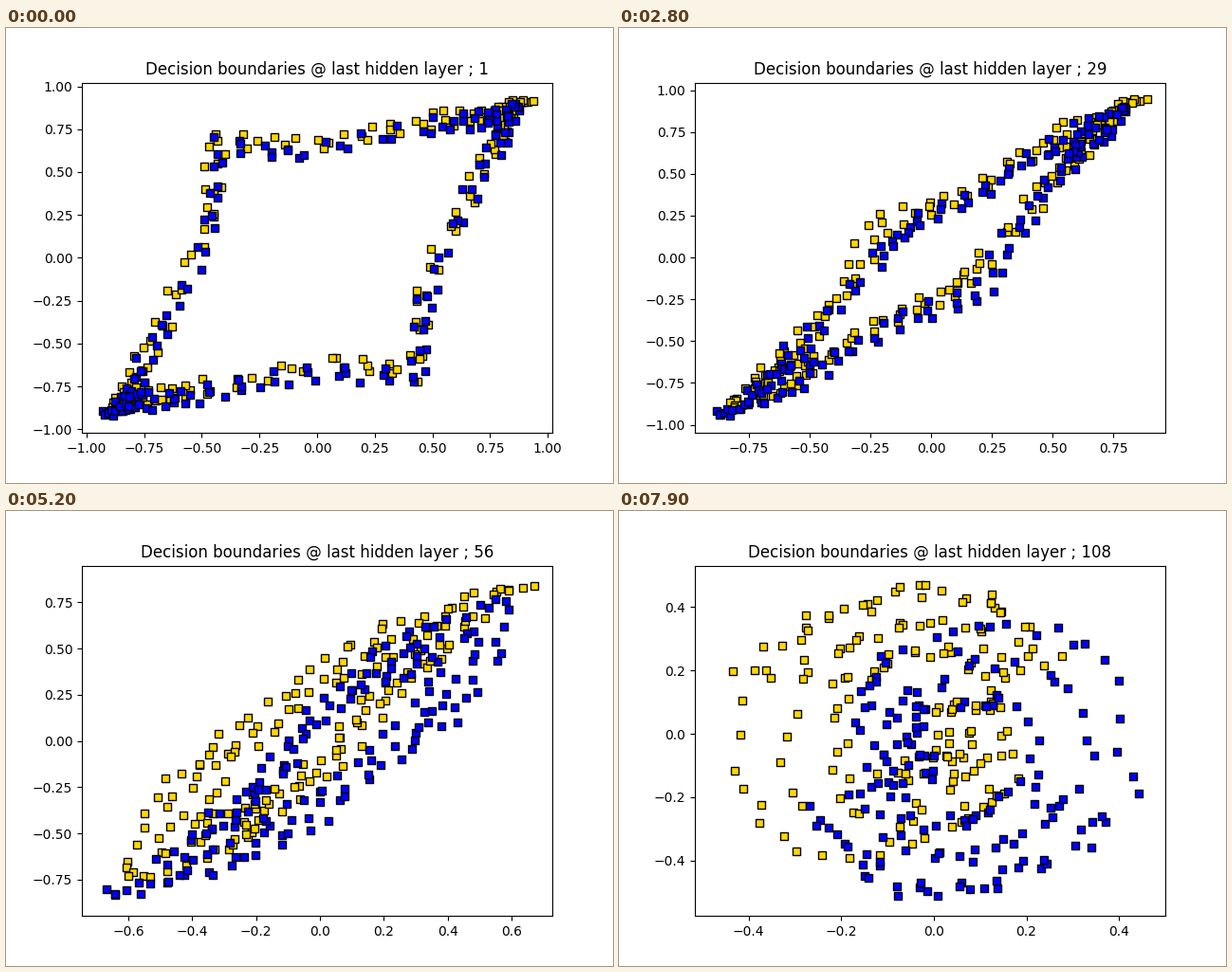
Write a matplotlib script that moves like this. It is 640 by 480 pixels and loops after 8000 ms.

```python
import numpy as np
import matplotlib.pyplot as plt
from matplotlib.animation import FuncAnimation

FRAMES, STEP = 80, 100
POINTS, TURNS = 165, 3
TIMES = [0, 9, 28, 43, 52, 68, 79]

# Outer turn of the gold spiral in hundredths, counterclockwise from the top right.
OUTLINES = np.array([
    [92, 91, 50, 84, 0, 70, -47, 74, -50, 20, -91, -91, -50, -83, 10, -66, 46, -74, 50, -15],
    [92, 92, 58, 72, 26, 76, 6, 70, -1, 25, -92, -92, -55, -72, -25, -79, -2, -35, 12, 40],
    [87, 94, 55, 80, 14, 42, -24, 26, -43, -28, -87, -94, -63, -86, -28, -50, 6, -28, 26, -4],
    [66, 82, 45, 78, 14, 50, -14, 24, -44, -20, -65, -88, -57, -75, -22, -45, 6, -2, 32, 28],
    [65, 83, 32, 70, 3, 48, -28, 5, -52, -28, -66, -84, -34, -67, -18, -52, 8, -13, 28, 32],
    [41, 53, 14, 36, -10, 39, -33, 25, -40, 2, -50, -60, -20, -37, 10, -36, 20, -10, 17, 12],
    [25, 22, 13, 45, -8, 47, -28, 36, -45, 20, -43, -33, -17, -46, 11, -34, 20, -18, 16, 9],
]).reshape(7, 10, 2) / 100

# Per stage: size of the inner turn, gathering at the two tips, scatter, blue offset.
INNER = [.85, .75, .65, .6, .45, .3, .3]
GATHER = [.8, .8, .7, .5, .2, -.4, -.2]
SPREAD = [.012, .014, .015, .018, .02, .018, .02]
OFFSET = [0, 0, 0, 0, 0, -.045, -.035]

# Per stage: left, right, bottom, top of the axes.
LIMITS = np.array([
    [-1.020, 1.020, -1.022, 1.022],
    [-1.029, 1.021, -1.034, 1.030],
    [-0.973, 0.965, -1.049, 1.045],
    [-0.739, 0.730, -1.001, 0.992],
    [-0.7455, 0.7277, -0.946, 0.949],
    [-0.583, 0.525, -0.698, 0.644],
    [-0.516, 0.500, -0.574, 0.530],
])

rng = np.random.default_rng(4)
noise = rng.normal(size=(2, POINTS, 2)).clip(-1.6, 1.6)
walk = np.linspace(0, 1, POINTS) ** 1.3


def spiral(outline, inner, gather):
    """Wind inwards along the outline, slowing down at its two tips."""
    turn = TURNS * walk
    turn = turn - gather * np.sin(4 * np.pi * turn) / (4 * np.pi)
    count = len(outline)
    ring = np.column_stack([np.interp(turn * count, np.arange(count), axis, period=count)
                            for axis in outline.T])
    center = outline.mean(axis=0)
    size = 1 - (1 - inner) * walk
    return center + (ring - center) * size[:, None]


paths = [spiral(*stage) for stage in zip(OUTLINES, INNER, GATHER)]
gold = np.array([p + s * noise[0] for p, s in zip(paths, SPREAD)])
blue = np.array([[0, o] - p + s * noise[1] for p, s, o in zip(paths, SPREAD, OFFSET)])


def blend(keys, t):
    i = min(np.searchsorted(TIMES, t, side="right") - 1, len(TIMES) - 2)
    f = (t - TIMES[i]) / (TIMES[i + 1] - TIMES[i])
    return keys[i] * (1 - f) + keys[i + 1] * f


def epoch(t):
    return t + 1 + round(27.9 * (max(t - 28, 0) / 51) ** 3)


fig, ax = plt.subplots(figsize=(6.4, 4.8), dpi=100)
dots = [ax.scatter([], [], marker="s", s=36, c=c, edgecolors="black", linewidths=1)
        for c in ("gold", "blue")]
title = ax.set_title("")


def draw(t):
    for dot, keys in zip(dots, (gold, blue)):
        dot.set_offsets(blend(keys, t))
    left, right, bottom, top = blend(LIMITS, t)
    ax.set_xlim(left, right)
    ax.set_ylim(bottom, top)
    title.set_text(f"Decision boundaries @ last hidden layer ; {epoch(t)}")
    return [*dots, title]


anim = FuncAnimation(fig, draw, frames=FRAMES, interval=STEP,
                     repeat=True, repeat_delay=0, blit=False)
plt.show()
```
